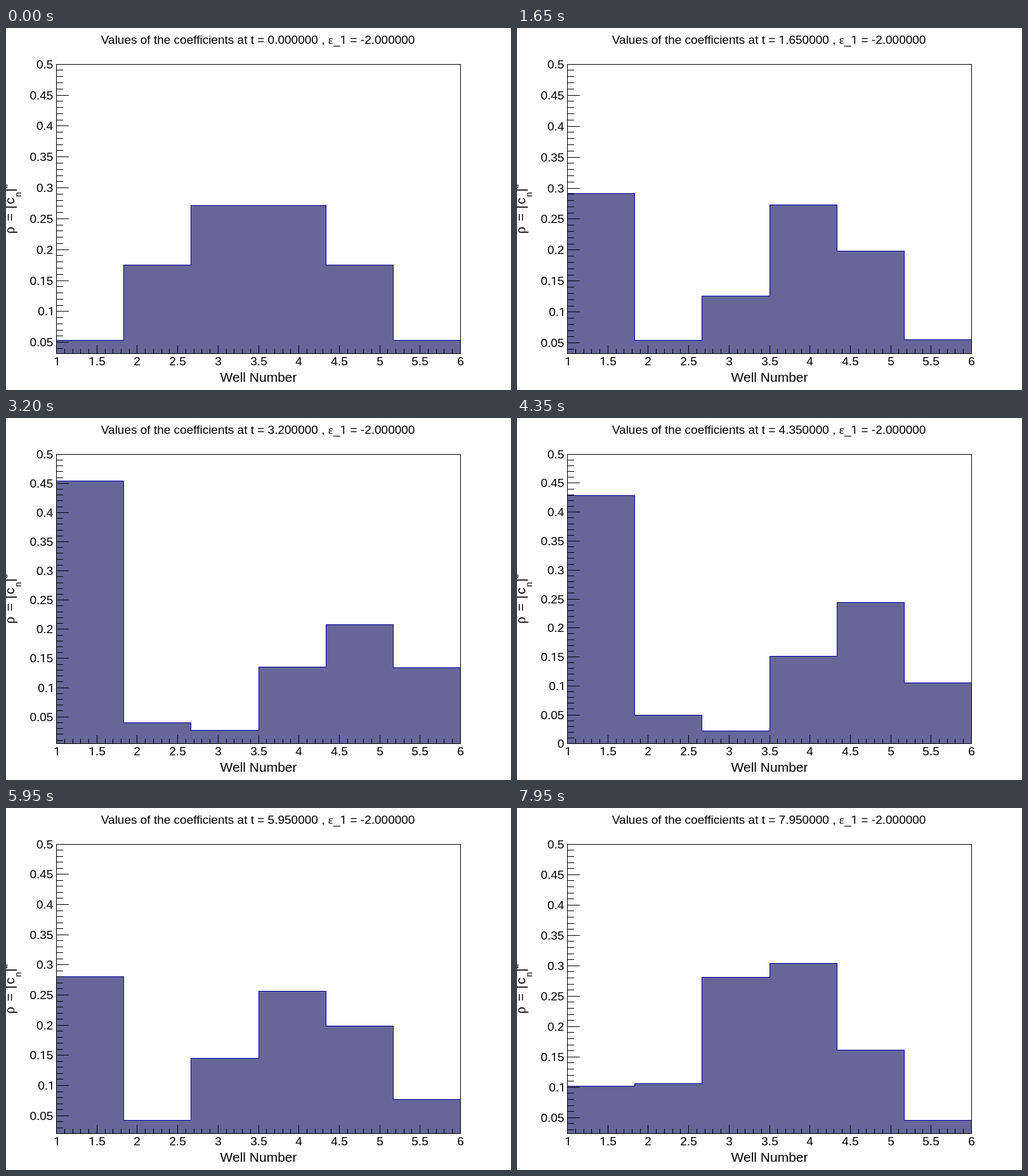
Write an HTML page with a canvas that moves like this. It is 796 by 572 pixels and loops after 8000 ms.

```html
<!DOCTYPE html>
<html lang="en">
<head>
<meta charset="utf-8">
<title>Well occupation</title>
<style>
  html, body { margin: 0; width: 100%; height: 100%; overflow: hidden; background: #fff; }
  canvas { display: block; }
</style>
</head>
<body>
<canvas id="stage" width="796" height="572"></canvas>
<script>
const ctx = document.getElementById('stage').getContext('2d');

const WELLS = 6, STEPS = 160, DT = 0.05, STEP_MS = 50;
const EPS = -2, HOP = 1, Y_MAX = 0.5;
const LEFT = 79.6, TOP = 57.2, WIDTH = 636.8, HEIGHT = 457.6;
const X0 = 79, X1 = 716, Y0 = 57, Y1 = 514;
const FILL = '#666699', LINE = '#000099';

// Glyphs set in another face: [font family, size factor, advance in em]
const SPECIAL = {
  '1': ['Roboto, sans-serif', 0.98, 0.556],
  'ε': ['"Liberation Serif", serif', 1, 0.439],
  'ρ': ['"Liberation Serif", serif', 1.05, 0.549]
};

// Tight-binding chain: (H c)_n = -J (c_{n-1} + c_{n+1}) + eps c_1
function applyH(c) {
  return c.map((v, n) => (n === 0 ? EPS * v : 0) - HOP * ((c[n - 1] || 0) + (c[n + 1] || 0)));
}

// One step of exp(-i H dt) as a power series
function evolve({ re, im }) {
  let a = re, b = im;
  const sumRe = re.slice(), sumIm = im.slice();
  for (let k = 1; k <= 10; k++) {
    const ha = applyH(a), hb = applyH(b), f = DT / k;
    a = hb.map(v => v * f);
    b = ha.map(v => -v * f);
    for (let n = 0; n < WELLS; n++) {
      sumRe[n] += a[n];
      sumIm[n] += b[n];
    }
  }
  return { re: sumRe, im: sumIm };
}

function simulate() {
  const norm = Math.sqrt(2 / (WELLS + 1));
  let state = {
    re: Array.from({ length: WELLS }, (_, n) => norm * Math.sin((n + 1) * Math.PI / (WELLS + 1))),
    im: new Array(WELLS).fill(0)
  };
  const out = [];
  for (let s = 0; s < STEPS; s++) {
    out.push(state.re.map((r, n) => r * r + state.im[n] ** 2));
    state = evolve(state);
  }
  return out;
}

const densities = simulate();

function runs(str, size) {
  return str.split(/([1ερ])/).filter(Boolean).map(text => {
    const sp = SPECIAL[text];
    const font = sp ? `${size * sp[1]}px ${sp[0]}` : `${size}px "Liberation Sans", Arial, sans-serif`;
    ctx.font = font;
    return { text, font, width: sp ? sp[2] * size : ctx.measureText(text).width };
  });
}

// align: 0 left, 0.5 centre, 1 right
function write(str, x, y, size, align = 0) {
  const parts = runs(str, size);
  x -= align * parts.reduce((sum, p) => sum + p.width, 0);
  for (const p of parts) {
    ctx.font = p.font;
    ctx.fillText(p.text, x, y);
    x += p.width;
  }
}

function hLine(xa, xb, y) { ctx.fillRect(xa, y, xb - xa + 1, 1); }
function vLine(x, ya, yb) { ctx.fillRect(x, Math.min(ya, yb), 1, Math.abs(yb - ya) + 1); }

function drawBars(rho, toY) {
  const edge = n => Math.floor(LEFT + WIDTH * n / WELLS);
  const tops = rho.map(toY);
  ctx.fillStyle = FILL;
  tops.forEach((y, n) => ctx.fillRect(edge(n), y, edge(n + 1) - edge(n), Y1 - y));
  ctx.fillStyle = LINE;
  tops.forEach((y, n) => {
    hLine(edge(n), edge(n + 1), y);
    if (n) vLine(edge(n), tops[n - 1], y);
  });
}

function drawFrame(tops) {
  hLine(X0, X1, Y0);
  hLine(X0, X1, Y1);
  vLine(X0, Y0, Y1);
  vLine(X1, Y0, tops - 1);
  vLine(X1, tops + 1, Y1);
}

function drawXAxis() {
  for (let k = 10; k <= 60; k++) {
    const x = Math.floor(LEFT + WIDTH * (k - 10) / 50);
    const major = k % 5 === 0;
    vLine(x, major ? 501 : 507, Y1);
    if (major) write(String(k / 10), x + (k === 10 ? 1.6 : 0.5), 533, 19, 0.5);
  }
  write('Well Number', 398, 559, 21, 0.5);
}

function drawYAxis(yMin, toY) {
  for (let k = Math.ceil(yMin * 100); k <= 50; k++) {
    const y = toY(k / 100);
    const major = k % 5 === 0;
    hLine(X0, major ? 98 : 89, y);
    if (major) write(String(k / 100), k === 10 ? 76.6 : 74.4, y + 7, 19, 1);
  }
}

function drawYTitle() {
  const put = (s, x, y, size = 21) => {
    ctx.save();
    ctx.translate(x, y);
    ctx.rotate(-Math.PI / 2);
    write(s, 0, 0, size);
    ctx.restore();
  };
  put('ρ', 13, 325);
  put('=', 13, 305.3);
  put('|', 13, 285.7);
  put('c', 13, 278.5);
  put('n', 23.5, 267, 14);
  put('|', 13, 258.7);
  put('2', 2, 254, 14);
}

function draw(step) {
  const rho = densities[step];
  const low = Math.min(...rho);
  const margin = 0.05 * (Y_MAX - low);
  const yMin = low > margin ? low - margin : 0;
  const toY = v => Math.floor(TOP + HEIGHT * (Y_MAX - v) / (Y_MAX - yMin) + 1e-6);

  ctx.fillStyle = '#fff';
  ctx.fillRect(0, 0, 796, 572);
  drawBars(rho, toY);
  ctx.fillStyle = '#000';
  drawFrame(toY(rho[WELLS - 1]));
  drawXAxis();
  drawYAxis(yMin, toY);
  drawYTitle();
  const time = (step * DT).toFixed(6);
  write(`Values of the coefficients at t = ${time} , ε_1 = ${EPS.toFixed(6)}`, 149.8, 25, 19);
}

const start = performance.now();
let shown = -1;
function tick() {
  const step = Math.floor((performance.now() - start) / STEP_MS) % STEPS;
  if (step !== shown) draw(shown = step);
  requestAnimationFrame(tick);
}
tick();
</script>
</body>
</html>
```
